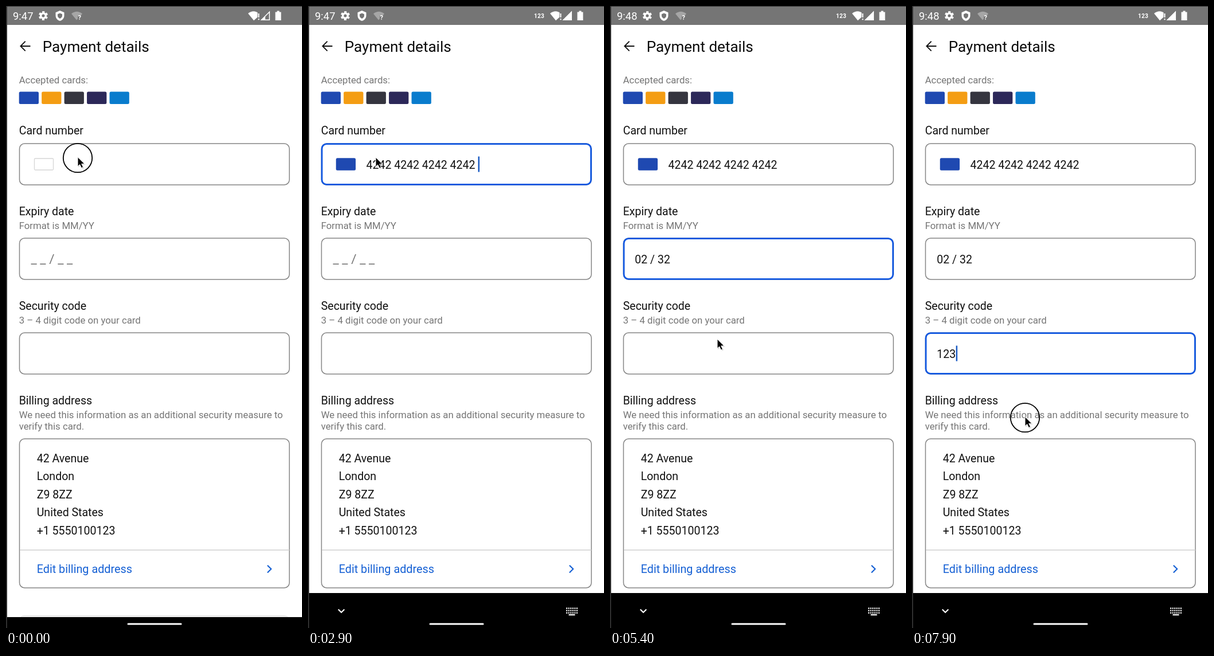
Recreate the animation shown at these times as an HTML page. Size 516 px wide and 1085 px high, loop 8000 ms.

```html
<!DOCTYPE html>
<html lang="en">
<head>
<meta charset="utf-8">
<title>Payment details</title>
<style>
html, body { margin: 0; width: 100%; height: 100%; overflow: hidden; background: #fff; }
svg { display: block; width: 516px; height: 1085px; font-family: Roboto, sans-serif; }
text { white-space: pre; }
.title { font-size: 26.05px; fill: #0b0b0b; }
.label { font-size: 19.55px; fill: #111; }
.hint { font-size: 16.78px; fill: #757575; }
.link { font-size: 19.8px; fill: #1560d4; }
.value { font-size: 19.5px; fill: #111; }
.blank { font-size: 22.7px; fill: #777; }
.box { fill: none; stroke: #858585; stroke-width: 1.5; }
.glow { fill: none; stroke: #1158e2; stroke-width: 2.8; }
</style>
</head>
<body>
<svg id="stage" viewBox="0 0 516 1085">
  <rect width="516" height="1085" fill="#fff"/>
  <g id="page"></g>

  <rect width="516" height="33" fill="#757575"/>
  <text id="clock" x="12" y="23.5" font-size="18.4" fill="#fff">9:47</text>
  <g transform="translate(65 17) rotate(30)" fill="none" stroke="#fff">
    <circle r="4.3" stroke-width="3.4"/>
    <circle r="6.6" stroke-width="3" stroke-dasharray="3.8 3.11" stroke-dashoffset="1.9"/>
  </g>
  <path d="M94 8l7.5 3.2v5.2c0 4.6-3 8.2-7.5 9.6c-4.5-1.4-7.5-5-7.5-9.6v-5.2z" fill="#fff"/>
  <path d="M94 12.5l4 1.7v2.6c0 2.3-1.5 4.2-4 5.2c-2.5-1-4-2.9-4-5.2v-2.6z" fill="#757575"/>
  <path d="M114 13.5q9.5-7.5 19 0l-3 3.7h-5v5l-2 2.3z" fill="#a6a6a6"/>
  <text x="125.5" y="24" font-size="11" font-weight="700" fill="#fff">?</text>
  <text id="mode" x="394" y="20.5" font-size="10.2" font-weight="700" letter-spacing=".1" fill="#fff">123</text>
  <path d="M422 13q9.5-7.5 19 0l-2.2 3v3.2l-6.8 6z" fill="#fff"/>
  <path d="M438.5 11h4v14h-4z" fill="#757575"/>
  <path d="M439.5 13h2v7h-2zm0 9h2v2.2h-2z" fill="#fff"/>
  <path d="M459.3 10.3v14h-14z" fill="none" stroke="#fff" stroke-width="1.5"/>
  <path d="M452 17v8h-8z" fill="#fff"/>
  <path id="signal" d="M460 8.8v16.2h-16.2z" fill="#fff"/>
  <path d="M469.5 10.5h3v-2h4v2h3v14.5h-10z" fill="#fff"/>

  <g id="bar">
    <rect y="1066" width="516" height="80" fill="#000"/>
    <g id="keys">
      <path d="M52.8 1094.5l5.3 5.3 5.3-5.3" fill="none" stroke="#fff" stroke-width="2"/>
      <path d="M450 1092.7h20M450 1096.7h20M450 1100.7h20" stroke="#fff" stroke-width="2.2" stroke-dasharray="2.2 1.36"/>
      <path d="M454.5 1104h11" stroke="#fff" stroke-width="2.2"/>
    </g>
  </g>
  <rect x="211.5" y="1076.5" width="95" height="3" rx="1.5" fill="#fff"/>
  <path d="M0 0h516v1H2v1084H0z" fill="#2e2e2e"/>

  <circle id="ring" r="25.2" fill="none" stroke="#000" stroke-width="1.8"/>
  <g id="mouse">
    <path d="M1 2v16l4-3.5 3 6 3-1.4-2.8-5.6h5.5z" fill="#000" opacity=".16"/>
    <path d="M0 0v16.3l3.7-3.3 2.8 6 3-1.4-2.8-5.7h5.3z" fill="#000" stroke="#fff" stroke-width="1" stroke-linejoin="round"/>
  </g>
</svg>
<script>
const LEFT = 22.7, INNER = 53.7, STEP = 165;
const $ = id => document.getElementById(id);
const text = (cls, x, y, str, id = '') => `<text ${id && `id="${id}"`} class="${cls}" x="${x}" y="${y}">${str}</text>`;
const box = (y, h) => `<rect class="box" x="23.5" y="${y}" width="470.5" height="${h}" rx="9"/>`;
const tile = (x, y, fill) => `<rect x="${x}" y="${y}" width="34.3" height="21.5" rx="2.5" fill="${fill}"/>`;

const tints = ['#1f49b1', '#f49d13', '#35353f', '#2c2859', '#097ccd'];
const address = ['42 Avenue', 'London', 'Z9 8ZZ', 'United States', '+1 5550100123'];
const labels = ['Expiry date', 'Security code', 'Billing address'];
const hints = ['Format is MM/YY', '3 – 4 digit code on your card',
  'We need this information as an additional security measure to'];

$('page').innerHTML =
  '<path d="M42.5 70H25.5M33.7 61.7L25.4 70l8.3 8.3" fill="none" stroke="#111" stroke-width="1.9"/>' +
  text('title', 63.8, 80, 'Payment details') +
  text('hint', LEFT, 135, 'Accepted cards:') +
  tints.map((c, i) => tile(LEFT + i * 39.45, 149.5, c)).join('') +
  text('label', LEFT, 223.5, 'Card number') +
  labels.map((s, i) => text('label', LEFT, 365 + i * STEP, s) + text('hint', LEFT, 389 + i * STEP, hints[i])).join('') +
  text('hint', LEFT, 739, 'verify this card.') +
  [0, 1, 2].map(i => box(240 + i * STEP, 72)).join('') + box(755, 260) +
  '<rect id="slot" x="49.5" y="266" width="33" height="20" rx="1.5" fill="#fff" stroke="#d6d6d6" stroke-width="1.3"/>' +
  `<g id="card">${tile(48.8, 265.3, tints[0])}</g>` +
  text('blank', 43.5, 449, '_ _ / _ _') +
  text('value', 101.5, 284, '', 'value0') +
  text('value', 43.3, 284 + STEP, '', 'value1') +
  text('value', 43.3, 284 + 2 * STEP, '', 'value2') +
  address.map((s, i) => text('label', INNER, 796 + i * 31.4, s)).join('') +
  '<path d="M24 949h470" stroke="#cfcfcf" stroke-width="1.3"/>' +
  text('link', INNER, 989, 'Edit billing address') +
  '<path d="M455.8 975.8l6.4 6.3-6.4 6.3" fill="none" stroke="#1560d4" stroke-width="2.1"/>' +
  '<rect x="23" y="1063.5" width="471" height="60" rx="9" fill="#f1f1f1" stroke="#e4e4e4"/>' +
  '<rect id="glow" class="glow" x="24.15" y="240.65" width="469.2" height="70.7" rx="8.4"/>' +
  '<rect id="caret" width="2.5" height="27" fill="#1c5cc4"/>';
const blank = document.querySelector('.blank');
blank.id = 'blank';

const clamp = v => Math.min(1, Math.max(0, v));
const ease = v => { v = clamp(v); return v * v * (3 - 2 * v); };
const show = (id, on) => $(id).setAttribute('opacity', Number(Boolean(on)));
const move = (id, x, y) => $(id).setAttribute('transform', `translate(${x} ${y})`);

// pointer stops: time, x, y
const stops = [[0, 125, 263.5], [2800, 125, 263.5], [2900, 118, 264], [3300, 167, 430],
  [5100, 167, 430], [5400, 187, 581], [5600, 187, 594], [7200, 187, 594], [7800, 197, 716.5], [8000, 197, 716.5]];
const presses = [[0, 200], [3300, 3500], [5700, 5900], [7800, 8000]];
const carets = [[500, 3000], [3400, 3900], [4300, 5200], [5900, 6400], [6800, 7400], [7900, 8000]];
const within = (t, spans) => spans.some(([a, b]) => t >= a && t < b);

function pointer(t) {
  const i = Math.max(1, stops.findIndex(s => s[0] > t));
  const [a, b] = [stops[i - 1], stops[i]];
  const k = (t - a[0]) / (b[0] - a[0]);
  return [a[1] + (b[1] - a[1]) * k, a[2] + (b[2] - a[2]) * k];
}

function digits(t) {
  if (t < 1000) return 0;
  if (t < 2300) return Math.min(13, Math.floor((t - 1000) / 85) + 1);
  return Math.min(16, 14 + Math.floor((t - 2300) / 100));
}

const typed = (t, steps) => steps.reduce((s, [at, str]) => t >= at ? str : s, '');
const width = s => [...s].reduce((w, c) => w + 19.5 * (c === ' ' ? .2475 : c === '/' ? .412 : .5615), 0);

function draw(t) {
  const number = '4242'.repeat(4).slice(0, digits(t)).replace(/(.{4})/g, '$1 ');
  const expiry = typed(t, [[4300, '0'], [4400, '02 / '], [4600, '02 / 3'], [4700, '02 / 32']]);
  const code = typed(t, [[6800, '1'], [6900, '12'], [7000, '123']]);
  const values = [number, expiry, code];
  values.forEach((s, i) => $('value' + i).textContent = s);
  show('blank', !expiry);
  show('slot', !number);
  show('card', number);

  const focus = t < 3400 ? 0 : t < 5900 ? 1 : 2;
  show('glow', t >= 300);
  move('glow', 0, focus * STEP);
  show('caret', within(t, carets));
  move('caret', (focus ? 43.8 : 102) + width(values[focus]), 262.5 + focus * STEP);

  const up = ease((t - 300) / 200);
  move('bar', 0, -42 * up);
  show('keys', up > 0);
  $('mode').setAttribute('opacity', t < 3400 ? clamp((t - 400) / 200) : clamp((t - 3450) / 400));
  show('signal', t >= 1300);
  $('clock').textContent = t < 3900 ? '9:47' : '9:48';

  const [x, y] = pointer(t);
  move('mouse', x, y);
  move('ring', x, y + 1.5);
  show('ring', within(t, presses));
}

function tick() {
  draw(Math.floor(performance.now() % 8000 / 100) * 100);
  requestAnimationFrame(tick);
}
tick();
</script>
</body>
</html>
```
